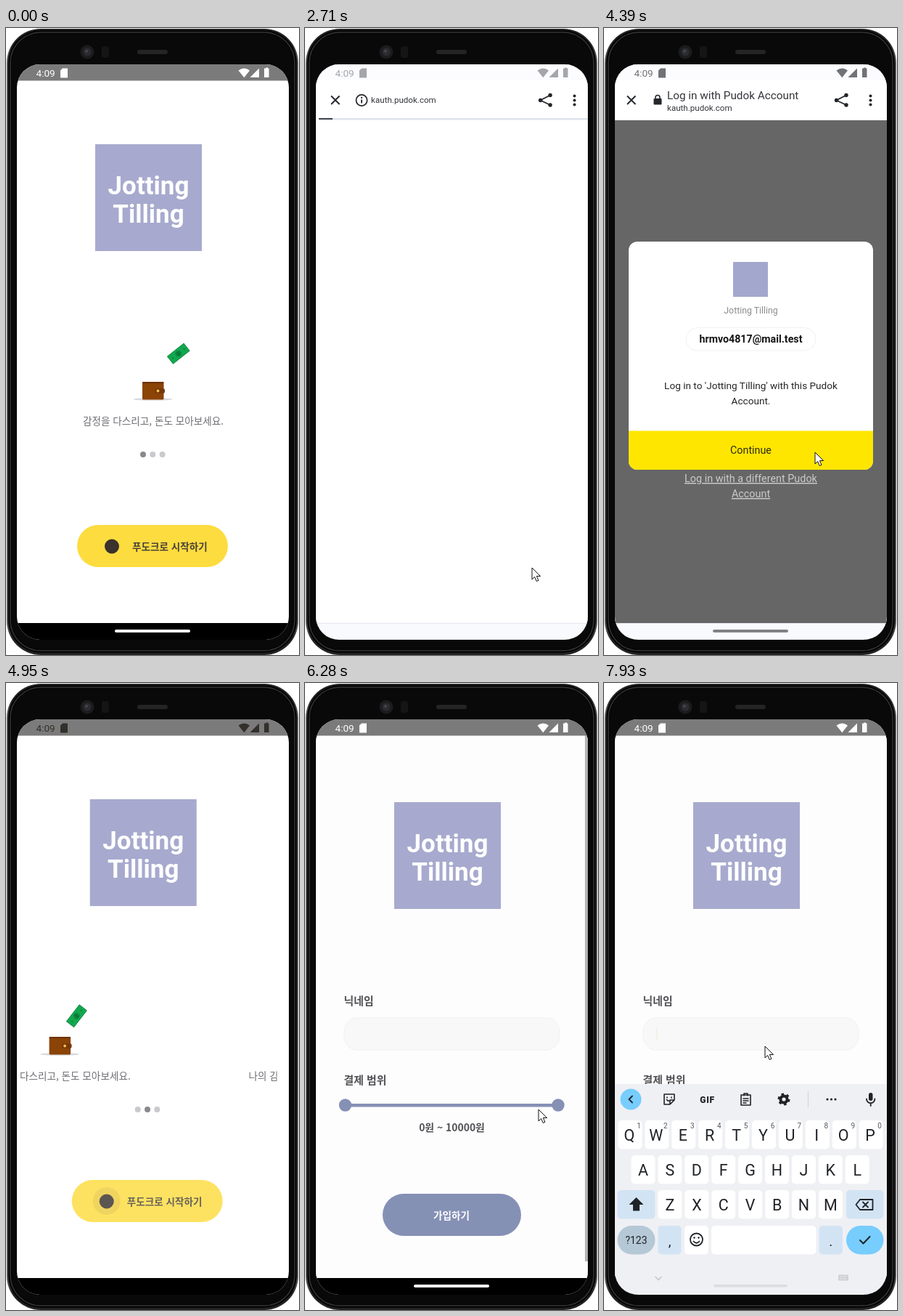
An HTML page that plays this animation: 404x863 px, repeating every 8000 ms.

```html
<!DOCTYPE html>
<html lang="ko">
<head>
<meta charset="utf-8">
<title>App sign-up</title>
<style>
  html, body { margin: 0; width: 100%; height: 100%; overflow: hidden; background: #fff; }
  svg { display: block; width: 404px; height: 863px; }
  text { font-family: Roboto, "Noto Sans", sans-serif; }
  .ko { font-family: "Noto Sans CJK KR", "Noto Sans CJK", "Noto Sans CJK JP", sans-serif; }
  .mid { text-anchor: middle; }
</style>
</head>
<body>
<svg id="stage" viewBox="0 0 404 863" xmlns="http://www.w3.org/2000/svg"></svg>
<script>
const LOOP = 8000;
const PAGE = 375;
const BRAND = "Jotting Tilling";
const PROVIDER = "Pudok";

const rect = (x, y, w, h, fill, r = 0, extra = "") =>
  `<rect x="${x}" y="${y}" width="${w}" height="${h}" rx="${r}" fill="${fill}" ${extra}/>`;
const circle = (x, y, r, fill, extra = "") =>
  `<circle cx="${x}" cy="${y}" r="${r}" fill="${fill}" ${extra}/>`;
const path = (d, fill, extra = "") => `<path d="${d}" fill="${fill}" ${extra}/>`;
const line = (d, color, width, extra = "") =>
  path(d, "none", `stroke="${color}" stroke-width="${width}" ${extra}`);
const text = (x, y, size, fill, str, cls = "", extra = "") =>
  `<text x="${x}" y="${y}" font-size="${size}" fill="${fill}" class="${cls}" ${extra}>${str}</text>`;
const group = (id, body, extra = "") => `<g id="${id}" ${extra}>${body}</g>`;

function phone() {
  return rect(1, 1, 402, 862, "url(#edge)", 47) +
    rect(3, 3, 398, 857, "#050505", 45) +
    rect(6, 6, 392, 851, "none", 42, 'stroke="#343434" stroke-width="1.5"') +
    rect(8, 8, 388, 847, "#090909", 40) +
    circle(112, 33, 9.5, "#1c1c1e") + circle(112, 33, 5.5, "#2b2c31") + circle(111, 32, 2, "#45464d") +
    rect(132, 25, 10, 16, "#151515", 3) +
    rect(181, 30, 42, 6, "#242424", 3);
}

function statusIcons() {
  return text(41.5, 67, 13.6, "currentColor", "4:09") +
    path("M78 55.5h7v13h-10v-10z", "currentColor") +
    path("M320.500 58.500q8-6 15.500 0l-7.700 9.700z", "currentColor") +
    path("M349 55.500v12.500h-12.500z", "currentColor") +
    path("M357.500 55.500h1v-1h2.500v1h1.500v12.500h-6.500v-12.500z", "currentColor");
}

const logo = dy =>
  rect(123, 160 + dy, 147, 147, "#a7aace") +
  BRAND.split(" ").map((word, i) =>
    text(196.5, 229 + dy + i * 39, 35, "#fff", word, "mid", 'font-weight="700"')).join("");

function wallet() {
  const bill = rect(-14.5, -6.500, 29, 13, "#12a84f", 0, 'stroke="#0c7a3a" stroke-width=".8"') +
    circle(0, 0, 4.4, "#0a8a3d") + line("M0-2.500v5M-1.500-1h3M-1.500 1.500h3", "#075f2a", .8) +
    circle(-10, 0, 1.3, "#0a8a3d") + circle(10, 0, 1.3, "#0a8a3d");
  return group("bill", bill) +
    `<ellipse cx="202.5" cy="511" rx="27" ry="1.8" fill="#d9d9dd"/>` +
    rect(188, 487, 29.500, 24.500, "#8b4306", 1.5) +
    rect(188, 487, 29.500, 2.2, "#70330a", 1) +
    rect(205.500, 496, 13.500, 7, "#76380a", 3) + circle(209.500, 499.500, 1.9, "#f2c14e");
}

function appScreen() {
  const dots = [0, 1, 2].map(i => circle(189 + 13.300 * i, 587, 4, "#c9c9ce", `id="dot${i}"`)).join("");
  const slides = wallet() +
    text(106, 546, 13.6, "#6e6e73", "감정을 다스리고, 돈도 모아보세요.", "ko") +
    text(463, 546, 13.6, "#6e6e73", "나의 감정 기록들을 한눈에 확인해보세요", "ko");
  const button = rect(98, 684, 208, 58, "#fddc3f", 29) +
    circle(146, 713, 19, "#eccd3e", 'id="ripple"') +
    circle(146, 713.500, 10, "#39322d") +
    text(174, 718.500, 13.6, "#4a4038", "푸도크로 시작하기", "ko", 'font-weight="700"');
  return logo(0) +
    `<g clip-path="url(#carousel)">${group("slides", slides)}</g>` + dots + group("startButton", button);
}

function signUpScreen() {
  const label = (y, str) => text(53.500, y, 14.9, "#505055", str, "ko", 'font-weight="700"');
  return rect(15, 72, 375, 747, "#fdfdfd") + logo(4) +
    label(443, "닉네임") +
    rect(54, 460.500, 297, 45, "#f8f8f9", 19, 'stroke="#f2f2f3"') +
    rect(72.500, 474, 1, 18, "#ece9d8", 0, 'id="caret"') +
    label(552, "결제 범위") +
    rect(55, 579, 294, 4.500, "#8590b5") + circle(55.500, 581, 8.700, "#8590b5") + circle(349, 581, 8.700, "#8590b5") +
    text(202.500, 617, 13.9, "#505055", "0원 ~ 10000원", "ko mid", 'font-weight="700"') +
    rect(107, 703, 191, 58, "#8590b5", 29) +
    text(202, 737.500, 13.6, "#fff", "가입하기", "ko mid", 'font-weight="700"') +
    rect(386, 72, 4, 724, "#b3b3b5", 0, 'id="scrollbar"');
}

function toolbar() {
  const ink = "#24262b";
  const share = circle(334, 92.500, 2.7, ink) + circle(334, 106, 2.7, ink) + circle(320.500, 99.500, 2.7, ink) +
    line("M334 92.500L320.500 99.500L334 106", ink, 1.8);
  return line("M32 93.500l11.500 11.500M43.500 93.500L32 105", ink, 1.9) + share +
    [93.500, 99.500, 105.500].map(y => circle(367.500, y, 2, ink)).join("") +
    group("info", circle(74, 99.500, 7.600, "none", `stroke="${ink}" stroke-width="1.7"`) +
      rect(73.100, 98.500, 1.8, 5, ink) + rect(73.100, 95, 1.8, 2, ink)) +
    group("lock", rect(68.500, 97, 11, 8.500, ink, 1) + line("M71 98v-2.500a3 3 0 0 1 6 0v2.500", ink, 1.6)) +
    text(87, 97.500, 15.3, "#33353a", `Log in with ${PROVIDER} Account`, "", 'id="title"') +
    text(87, 103, 11.6, "#33353a", "kauth.pudok.com", "", 'id="url"');
}

function loginPage() {
  const centred = (y, size, fill, str, extra) => text(202.500, y, size, fill, str, "mid", extra);
  const link = 'text-decoration="underline"';
  return rect(0, 127, 450, 692, "#666") +
    rect(34, 294, 337, 314, "#fff", 12) +
    path("M34 554.500h337v41.500a12 12 0 0 1-12 12h-313a12 12 0 0 1-12-12z", "#ffe600", 'id="continue"') +
    rect(178, 322, 48, 48, "#a3a7ce") +
    centred(392.500, 12.3, "#8b8b8b", BRAND) +
    rect(113, 412.500, 179, 31.500, "#fff", 15.750, 'stroke="#f1f1f1"') +
    centred(432.500, 14.2, "#151515", "hrmvo4817@mail.test", 'font-weight="700"') +
    centred(497, 13.6, "#252525", `Log in to '${BRAND}' with this ${PROVIDER}`) +
    centred(518, 13.6, "#252525", "Account.") +
    centred(586, 14.3, "#30290c", "Continue") +
    centred(625, 14.4, "#cbcbcb", `Log in with a different ${PROVIDER}`, link) +
    centred(646, 14.4, "#cbcbcb", "Account", link);
}

function webView() {
  const body = rect(-45, 72, 480, 747, "#fff") + toolbar() +
    rect(15, 124, 375, 2.5, "#dde3ec", 0, 'id="track"') + rect(15, 124, 0, 2, "#3f444c", 0, 'id="progress"') +
    group("loginPage", loginPage());
  return rect(15, 50, 375, 22.500, "#fcfcfe") + group("webBody", body) +
    rect(15, 819, 375, 23, "#f9fafe") + rect(15, 819, 375, 1, "#e3e6ee");
}

function keyboard() {
  const ink = "#1f2226", blue = "#d2e4f4", accent = "#77cdfd";
  const key = (x, y, w, fill, r = 5) => rect(x, y, w, 39.500, fill, r);
  const row = (letters, x, y, digits = "") => [...letters].map((c, i) => {
    const cx = x + 36.9 * i;
    return key(cx - 16.500, y, 33, "#fff") + text(cx - (digits ? 1 : 0), y + 28, 21.5, ink, c, "mid") +
      (digits ? text(cx + 12, y + 11, 10, "#55585d", digits[i], "mid") : "");
  }).join("");
  const stroke = (d, w = 1.8) => line(d, ink, w, 'stroke-linecap="round" stroke-linejoin="round"');
  const tools = circle(37, 573, 14.500, accent) + stroke("M39 568.500l-4.500 4.500l4.500 4.500") +
    stroke("M83 566h14v8l-6 6h-8zM97 574h-6v6M87 570v1M93 570v1M86.500 573.500q1.500 2 3 1.500", 1.6) +
    text(142.500, 577.500, 12, ink, "GIF", "mid", 'font-weight="900" letter-spacing=".7"') +
    stroke("M189 567h13v14h-13zM193 568v-3h5v3M192 572h7M192 575h7M192 578h4", 1.6) +
    circle(248, 573, 4.600, "none", `stroke="${ink}" stroke-width="4"`) +
    circle(248, 573, 7, "none", `stroke="${ink}" stroke-width="3" stroke-dasharray="3.5 3.83"`) +
    rect(281, 562, 1, 22, "#cfd1d6") +
    [308, 313.500, 319].map(x => circle(x, 573, 1.6, ink)).join("") +
    rect(365, 564, 5.500, 11, ink, 2.750) + stroke("M362 572.500a5.700 5.700 0 0 0 11.400 0M367.700 578.500v3.500");
  const lower = key(18.500, 698, 52, blue) + path("M44.500 708l10 10h-5.500v8.500h-9v-8.500h-5.500z", ink) +
    row("ZXCVBNM", 91, 698) + key(334, 698, 51.500, blue) +
    stroke("M353 711h17.500v14h-17.500l-5.500-7zM357 714.500l7 7M364 714.500l-7 7");
  const bottom = key(18.500, 747, 52, "#b5c8d6", 19.7) + text(44.500, 772, 14, ink, "?123", "mid") +
    key(74.500, 747, 32, blue) + text(90.500, 775, 19, ink, ",", "mid") +
    key(111, 747, 33, "#fff") + circle(127.500, 766, 8.500, "none", `stroke="${ink}" stroke-width="1.8"`) +
    circle(124.500, 763.500, 1.2, ink) + circle(130.500, 763.500, 1.2, ink) + stroke("M123.500 768.500q4 4.500 8 0") +
    key(148, 747, 144.500, "#fff") + key(296.500, 747, 32.500, blue) + text(312.700, 775, 19, ink, ".", "mid") +
    key(334, 747, 51.500, accent, 19.7) + stroke("M353 767l4.500 4.500l9-9.500", 2);
  const nav = line("M70.500 817l4.500 4.500l4.500-4.500", "#c6c8cd", 1.7) +
    rect(323, 814.500, 14, 8, "#cfd1d5", 1) + line("M325 817h10M325 820h10", "#eff0f4", 1, 'stroke-dasharray="1.5 1"') +
    rect(151, 828, 102, 3.500, "#dcdde1", 1.750);
  return rect(15, 552, 375, 291, "#eff0f4") + tools + row("QWERTYUIOP", 36, 602, "1234567890") +
    row("ASDFGHJKL", 54, 650) + lower + bottom + nav;
}

document.getElementById("stage").innerHTML = `
  <defs>
    <linearGradient id="edge"><stop offset="0" stop-color="#555"/><stop offset=".02" stop-color="#222"/>
      <stop offset=".98" stop-color="#222"/><stop offset="1" stop-color="#555"/></linearGradient>
    <clipPath id="screen"><rect x="15" y="50" width="375" height="792" rx="32"/></clipPath>
    <clipPath id="carousel"><rect x="23" y="400" width="358" height="160"/></clipPath>
  </defs>
  ${phone()}
  <g clip-path="url(#screen)">
    ${rect(15, 50, 375, 792, "#fff")}
    ${group("app", appScreen())}
    ${group("signUp", signUpScreen())}
    ${rect(15, 50, 375, 22.5, "#7b7b7b")}
    ${rect(15, 819, 375, 24, "#000")}
    ${group("web", webView())}
    ${group("status", statusIcons())}
    ${rect(150, 828, 104, 4, "#fff", 2, 'id="pill"')}
    ${group("keyboard", keyboard())}
  </g>
  ${group("cursor", path("M0 0v16l3.700-3.500l2.500 6l2.700-1.200l-2.500-5.800h5.200z", "#fff", 'stroke="#111" stroke-width="1"'))}`;

const el = {};
document.querySelectorAll("[id]").forEach(node => el[node.id] = node);

const clamp = v => Math.min(1, Math.max(0, v));
const span = (t, from, to) => clamp((t - from) / (to - from));
const easeOut = (v, power = 5) => 1 - (1 - v) ** power;
const smooth = v => v * v * (3 - 2 * v);
const move = (node, x, y = 0, more = "") => node.setAttribute("transform", `translate(${x} ${y}) ${more}`);
const fade = (node, v) => node.setAttribute("opacity", v);

// Interpolates rows of [time, ...values].
function follow(keys, t, ease = v => v) {
  const next = keys.findIndex(k => k[0] > t);
  if (next === 0) return keys[0].slice(1);
  if (next < 0) return keys[keys.length - 1].slice(1);
  const a = keys[next - 1], b = keys[next], p = ease(span(t, a[0], b[0]));
  return a.slice(1).map((v, i) => v + (b[i + 1] - v) * p);
}

const billPath = [[0, 244, 438, -24], [200, 238, 448, -38], [254, 226, 458, -52], [298, 216, 471, -63], [390, 206, 500, -78]];
const cursorPath = [[880, 326, -20], [1660, 256, 715], [2260, 256, 715], [2500, 302, 750], [2640, 313, 743],
  [3660, 313, 743], [4110, 298, 587], [4220, 298, 587], [4390, 291, 584], [5000, 322, 587],
  [6290, 322, 587], [6560, 222, 500]];
const loadPath = [[2620, 0], [2710, 18], [2900, 200], [3130, 375]];

function drawBill(t) {
  const flight = (t + 200) % 1632, left = flight >= 816;
  const local = flight % 816;
  const [x, y, angle] = follow(billPath, local);
  move(el.bill, left ? 405 - x : x, y, `rotate(${left ? -angle : angle})`);
  fade(el.bill, local < 390 ? span(local, 0, 90) : 0);
}

function draw(t) {
  const open = easeOut(span(t, 2550, 3000)), close = easeOut(span(t, 4825, 5275));
  const webAlpha = span(t, 2550, 2640) * (1 - span(t, 4825, 4935));
  const webOn = t > 2550 && t < 4880;

  drawBill(t);
  move(el.app, t < 4825 ? -37.5 * open : -37.5 * (1 - close));
  move(el.slides, -PAGE * smooth(span(t, 4820, 5165)));
  for (let i = 0; i < 3; i++) el["dot" + i].setAttribute("fill", i === (t < 4825 ? 0 : 1) ? "#88888d" : "#c9c9ce");
  const press = span(t, 2100, 2180) * (1 - span(t, 2260, 2420));
  fade(el.startButton, t > 4800 ? .82 + .18 * span(t, 5050, 5250) : 1 - .6 * press);
  fade(el.ripple, t > 4800 ? 1 - span(t, 5050, 5250) : 0);

  fade(el.web, webAlpha);
  move(el.webBody, t < 4825 ? 37.5 * (1 - open) : 37.5 * close);
  const loaded = span(t, 3130, 3300), titled = span(t, 3690, 3830);
  el.progress.setAttribute("width", follow(loadPath, t)[0]);
  fade(el.progress, 1 - loaded);
  fade(el.track, 1 - loaded);
  fade(el.loginPage, loaded);
  fade(el.info, t < 3300 ? 1 : 0);
  fade(el.lock, t < 3300 ? 0 : 1);
  fade(el.title, titled);
  el.url.setAttribute("y", 103 + 11 * titled);
  el.continue.setAttribute("fill", t > 4530 && t < 4720 ? "#f2da00" : "#ffe600");

  el.status.style.color = webOn ? (t < 3200 ? "#a3a6ab" : "#6f7277") : t > 4800 && t < 5200 ? "#33302c" : "#fff";
  el.pill.setAttribute("fill", webOn ? "#808186" : "#fff");
  fade(el.pill, t < 2550 ? 1 : webOn ? span(t, 3400, 4200) : span(t, 5370, 6000));

  const entered = easeOut(span(t, 5370, 5720), 3);
  fade(el.signUp, span(t, 5370, 5570));
  move(el.signUp, 0, 36 * (1 - entered));
  fade(el.scrollbar, 1 - span(t, 6860, 7290));
  fade(el.caret, t > 6860 ? 1 : 0);

  move(el.keyboard, 0, 292 * (1 - easeOut(span(t, 7490, 7860), 3)));
  el.keyboard.style.display = t < 7490 ? "none" : "";

  const [x, y] = follow(cursorPath, t, smooth);
  move(el.cursor, x, y);
  el.cursor.style.display = t < 885 || (t > 4780 && t < 5650) ? "none" : "";
}

const start = performance.now();
function tick(now) {
  draw(Math.max(0, now - start) % LOOP);
  requestAnimationFrame(tick);
}
draw(0);
requestAnimationFrame(tick);
</script>
</body>
</html>
```
